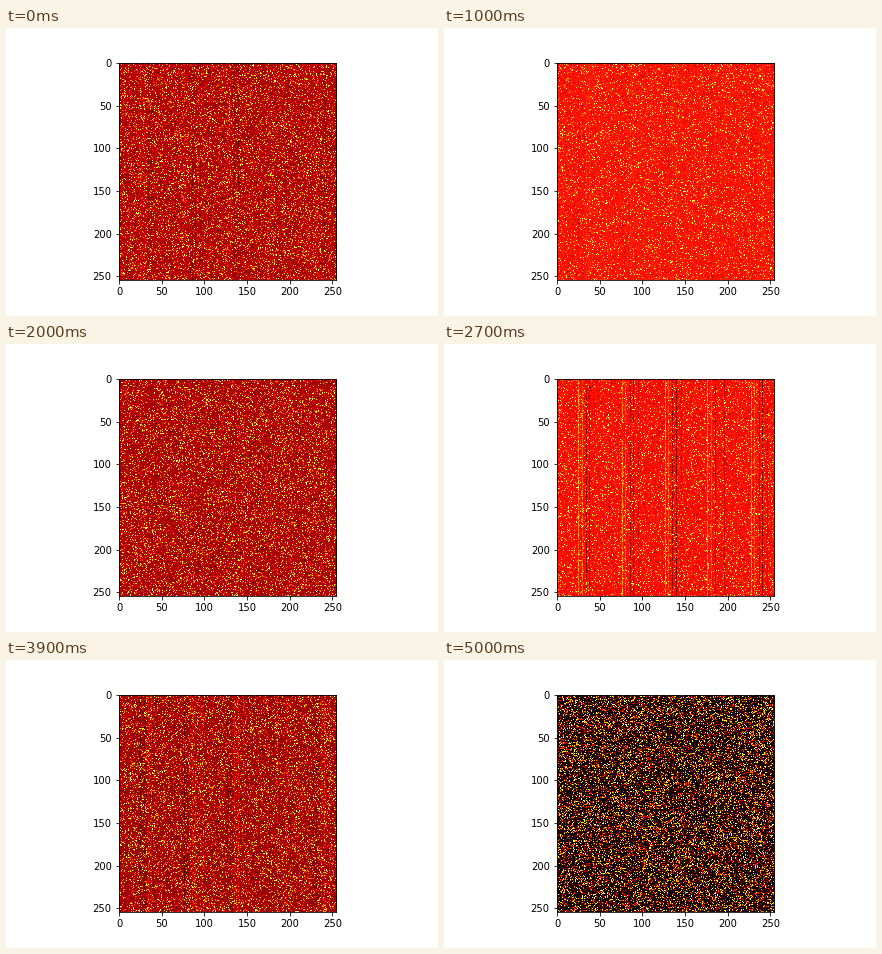
A matplotlib script that plays this animation: 432 px wide and 288 px high, repeating every 5100 ms.

```python
import matplotlib.pyplot as plt
import numpy as np
from matplotlib.animation import FuncAnimation

SIZE = 255
FRAMES = 51
INTERVAL = 100
PERIOD = 20.7  # frames per swing
BANDS = 5
BAND_STEP = 50.5


def stripe_pattern():
    """Evenly spaced bands: two bright columns followed by three dark ones."""
    pattern = np.zeros((SIZE, SIZE))
    for band in range(BANDS):
        start = round(25 + BAND_STEP * band)
        for offset, strength in ((0, 1), (4, 0.6), (9, -0.8), (13, -1), (19, -0.5)):
            pattern[:, start + offset] = strength
    pattern[53:73, 70:100] *= 0.15
    return pattern


PATTERN = stripe_pattern()


def wave(frame, peak):
    return np.cos(2 * np.pi * (frame - peak) / PERIOD)


def field(frame):
    rng = np.random.default_rng(100 + frame)
    shape = (SIZE, SIZE)
    fade = 1 - (frame / (FRAMES - 1)) ** 12
    level = fade * (0.32 + 0.08 * wave(frame, 8.5))
    swing = fade * wave(frame, 4.4)

    stripes = 0.28 * swing * PATTERN * rng.uniform(0.2, 1.2, shape)
    grain = rng.normal(0, 0.02, shape)
    pits = 0.12 * (rng.random(shape) < 0.06)
    base = level + stripes + grain - pits

    # Sparks lift a cell toward pale yellow; darker frames carry more of them
    lit = rng.random(shape) < 0.4 - 0.7 * level
    lift = lit * rng.random(shape) ** 1.2
    return np.clip(base + (0.92 - base) * lift, 0, 1)


fig, ax = plt.subplots(figsize=(6, 4), dpi=72, facecolor="white")
fig.subplots_adjust(left=0.125, right=0.9, bottom=0.125, top=0.88)
image = ax.imshow(field(0), cmap="hot", vmin=0, vmax=1, interpolation="nearest")
ax.set_xticks(range(0, SIZE, 50))
ax.set_yticks(range(0, SIZE, 50))


def update(frame):
    image.set_data(field(frame))
    return [image]


anim = FuncAnimation(fig, update, frames=FRAMES, interval=INTERVAL, repeat=True)
plt.show()
```
